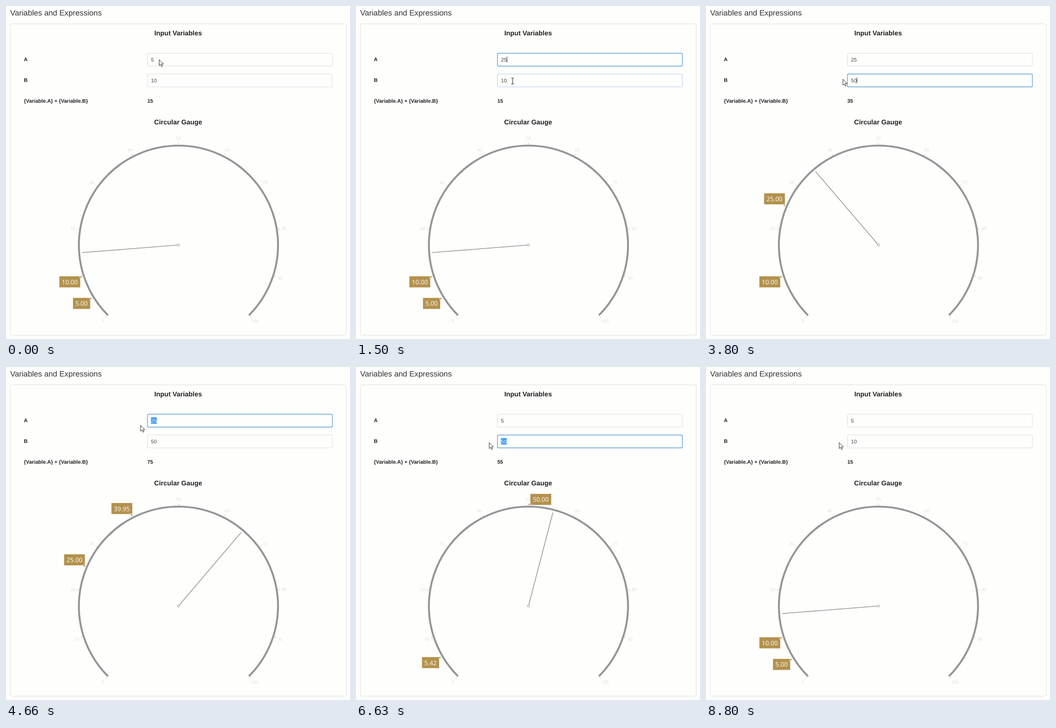
These frames come from a looping animation (760 by 737 pixels, 8860 ms). An HTML page:

```html
<!DOCTYPE html>
<html lang="en">
<head>
<meta charset="utf-8">
<title>Variables and Expressions</title>
<style>
  html, body { margin: 0; width: 100%; height: 100%; overflow: hidden; background: #fefefd; }
  svg { display: block; width: 760px; height: 737px; }
  text { font: 11.45px "Liberation Sans", Arial, sans-serif; fill: #333; text-rendering: geometricPrecision; white-space: pre; }
  .title { font-size: 17.2px; }
  .head { font-size: 14.8px; font-weight: bold; text-anchor: middle; fill: #222; }
  .bold { font-weight: bold; fill: #222; }
  .scale { font: 9.6px "Open Sans", "Noto Sans", sans-serif; fill: #dcdcdc; text-anchor: middle; }
  .badge { font: 13.8px "Open Sans", "Noto Sans", sans-serif; fill: #fff; text-anchor: middle; }
</style>
</head>
<body>
<svg id="stage" viewBox="0 0 760 737" xmlns="http://www.w3.org/2000/svg">
  <rect x="9.5" y="39.5" width="742" height="689" rx="3" fill="none" stroke="#ddd"/>
  <text class="title" x="9.3" y="21.3">Variables and Expressions</text>
  <text class="head" x="380.3" y="65">Input Variables</text>
  <text class="head" x="380.3" y="262.3">Circular Gauge</text>
  <text class="bold" x="39.5" y="121.8">A</text>
  <text class="bold" x="39.5" y="167.8">B</text>
  <text class="bold" x="39.5" y="214">{Variable.A} + {Variable.B}</text>
</svg>
<script>
const LOOP = 8860, CX = 381, CY = 529, RADIUS = 220, BLINK = 530;
const GREY = '#959595', GOLD = '#b3924d';
const TEXT_X = 320.3, DIGIT = 6.37;
const stage = document.getElementById('stage');

function add(tag, attrs, parent = stage) {
  const el = document.createElementNS('http://www.w3.org/2000/svg', tag);
  set(el, attrs);
  return parent.appendChild(el);
}
function set(el, attrs) {
  for (const key in attrs) el.setAttribute(key, attrs[key]);
}
function show(el, visible) {
  el.style.display = visible ? '' : 'none';
}
function polar(value, r) {
  const a = (value * 2.7 - 135) * Math.PI / 180;
  return [CX + r * Math.sin(a), CY - r * Math.cos(a)];
}
function line(p, q, stroke, width) {
  return add('line', { x1: p[0], y1: p[1], x2: q[0], y2: q[1], stroke, 'stroke-width': width });
}

// Text, selection and focus of each input: [time, text, selected]; focus as [from, to].
const fields = [
  {
    y: 104.5,
    steps: [[0, '5'], [460, '5', true], [1100, '2'], [1300, '25'], [4480, '25', true], [5300, '5']],
    focus: [[360, 1548], [4292, 5906]]
  },
  {
    y: 150.5,
    steps: [[0, '10'], [1680, '10', true], [2600, '5'], [2700, '50'], [5980, '50', true], [6850, '1'], [7100, '10']],
    focus: [[1548, 4292], [5906, 7767]]
  }
].map(makeField);

function makeField(field) {
  const y = field.y;
  return {
    ...field,
    box: add('rect', { x: 312.5, y, width: 408.5, height: 28.5, rx: 2.5, fill: 'none' }),
    mark: add('rect', { x: TEXT_X, y: y + 7, height: 14, fill: '#3390ff' }),
    label: add('text', { x: TEXT_X, y: y + 18 }),
    caret: add('rect', { y: y + 7.5, width: 1, height: 13, fill: '#222' })
  };
}

const sum = add('text', { class: 'bold', x: 312.2, y: 214 });

for (let v = 0; v <= 100; v += 10) {
  line(polar(v, 223), polar(v, 226), '#aaa', 1);
  const [x, y] = polar(v, v === 100 ? 239 : 236.4);
  add('text', { class: 'scale', x, y: y + 3.5 }).textContent = v;
}
add('path', {
  d: `M${polar(0, RADIUS)}A${RADIUS} ${RADIUS} 0 1 1 ${polar(100, RADIUS)}`,
  fill: 'none', stroke: GREY, 'stroke-width': 4.2
});
const needle = line([CX, CY], [CX, CY], GREY, 1.6);
add('circle', { cx: CX, cy: CY, r: 2.5, fill: '#fefefd', stroke: GREY });

const badges = [0, 1].map(() => ({
  shape: add('path', { fill: GOLD }),
  label: add('text', { class: 'badge' })
}));

const arrow = add('path', {
  d: 'M0 0V13.2L3 10.4 5.1 15.3 7.3 14.3 5.2 9.6H9.4Z',
  fill: '#fff', stroke: '#222', 'stroke-width': 1, 'stroke-linejoin': 'round'
});
const beam = add('path', {
  d: 'M-3-6.5H-1Q0-6.5 0-5.5Q0-6.5 1-6.5H3M0-5.5V5.5M-3 6.5H-1Q0 6.5 0 5.5Q0 6.5 1 6.5H3',
  fill: 'none', stroke: '#222', 'stroke-width': 1.1
});

// Pointer path: [time, x, y]
const pointer = [
  [0, 338.5, 118.8], [360, 338.5, 118.8], [490, 318, 120], [600, 328, 162], [800, 328, 162],
  [1300, 346, 166], [1560, 346, 166], [1950, 302.5, 162], [3800, 302.5, 162], [4270, 342, 118],
  [4310, 342, 118], [4620, 297.5, 129], [4750, 297.5, 129], [5360, 346, 168], [5500, 346, 168],
  [5630, 347, 168.5], [5880, 347, 168.5], [5960, 319, 168], [6090, 294.3, 167.3]
];

function pointerAt(t) {
  const i = pointer.findIndex(p => p[0] > t);
  if (i < 0) return pointer[pointer.length - 1].slice(1);
  const [t0, x0, y0] = pointer[i - 1], [t1, x1, y1] = pointer[i];
  const u = (t - t0) / (t1 - t0), k = u * u * (3 - 2 * u);
  return [x0 + (x1 - x0) * k, y0 + (y1 - y0) * k];
}

// Cubic ease-out over one second
function ease(t, start) {
  const u = Math.min(1, Math.max(0, (t - start) / 1000));
  return 1 - (1 - u) ** 3;
}

function drawField(field, t, hover) {
  const [since, value, selected] = field.steps.filter(s => s[0] <= t).pop();
  const focus = field.focus.find(f => t >= f[0] && t < f[1]);
  const marked = Boolean(focus && selected);
  const width = value.length * DIGIT;
  set(field.box, {
    stroke: focus ? '#5a9fd4' : hover ? '#b0cbe8' : '#ddd',
    'stroke-width': focus ? 1.4 : 1.1
  });
  field.label.textContent = value;
  field.label.style.fill = marked ? '#fff' : '#444';
  set(field.mark, { width });
  show(field.mark, marked);
  set(field.caret, { x: TEXT_X + width });
  const blinkStart = focus ? Math.max(since, focus[0]) : 0;
  show(field.caret, focus && !marked && (t - blinkStart) % (2 * BLINK) < BLINK);
}

function drawBadge(badge, value) {
  const [x, y] = polar(value, 223.7);
  const text = value.toFixed(2), tail = 4.3, h = 24.5;
  const w = text.length > 4 ? 46 : 38;
  let left, top, tip;
  if (value >= 50) {
    [left, top] = [x + tail, y - h];
    tip = `M${x} ${y}h${tail + 1}v-6z`;
  } else if (value > 50 / 3) {
    [left, top] = [x - w, y - tail - h];
    tip = `M${x} ${y}v${-tail - 1}h-6z`;
  } else {
    [left, top] = [x - tail - w, y];
    tip = `M${x} ${y}h${-tail - 1}v6z`;
  }
  set(badge.shape, { d: `M${left} ${top}h${w}v${h}h${-w}z${tip}` });
  set(badge.label, { x: left + w / 2, y: top + 17.6 });
  badge.label.textContent = text;
}

function render(t) {
  const [px, py] = pointerAt(t);
  const over = fields.map(f => px >= 312 && py >= f.y && py <= f.y + 29);
  fields.forEach((f, i) => drawField(f, t, over[i] && t >= 100));

  const useBeam = t >= 360 && over.includes(true);
  show(beam, useBeam);
  show(arrow, !useBeam);
  set(useBeam ? beam : arrow, { transform: `translate(${px} ${py})` });

  const a = 5 + 20 * (ease(t, 1548) - ease(t, 5906));
  const b = 10 + 40 * (ease(t, 4292) - ease(t, 7767));
  sum.textContent = t < 1548 ? 15 : t < 4292 ? 35 : t < 5906 ? 75 : t < 7767 ? 55 : 15;
  const [x2, y2] = polar(a + b, 214);
  set(needle, { x2, y2 });
  drawBadge(badges[0], a);
  drawBadge(badges[1], b);
}

const begin = performance.now();
function tick() {
  render((performance.now() - begin) % LOOP);
  requestAnimationFrame(tick);
}
tick();
</script>
</body>
</html>
```
